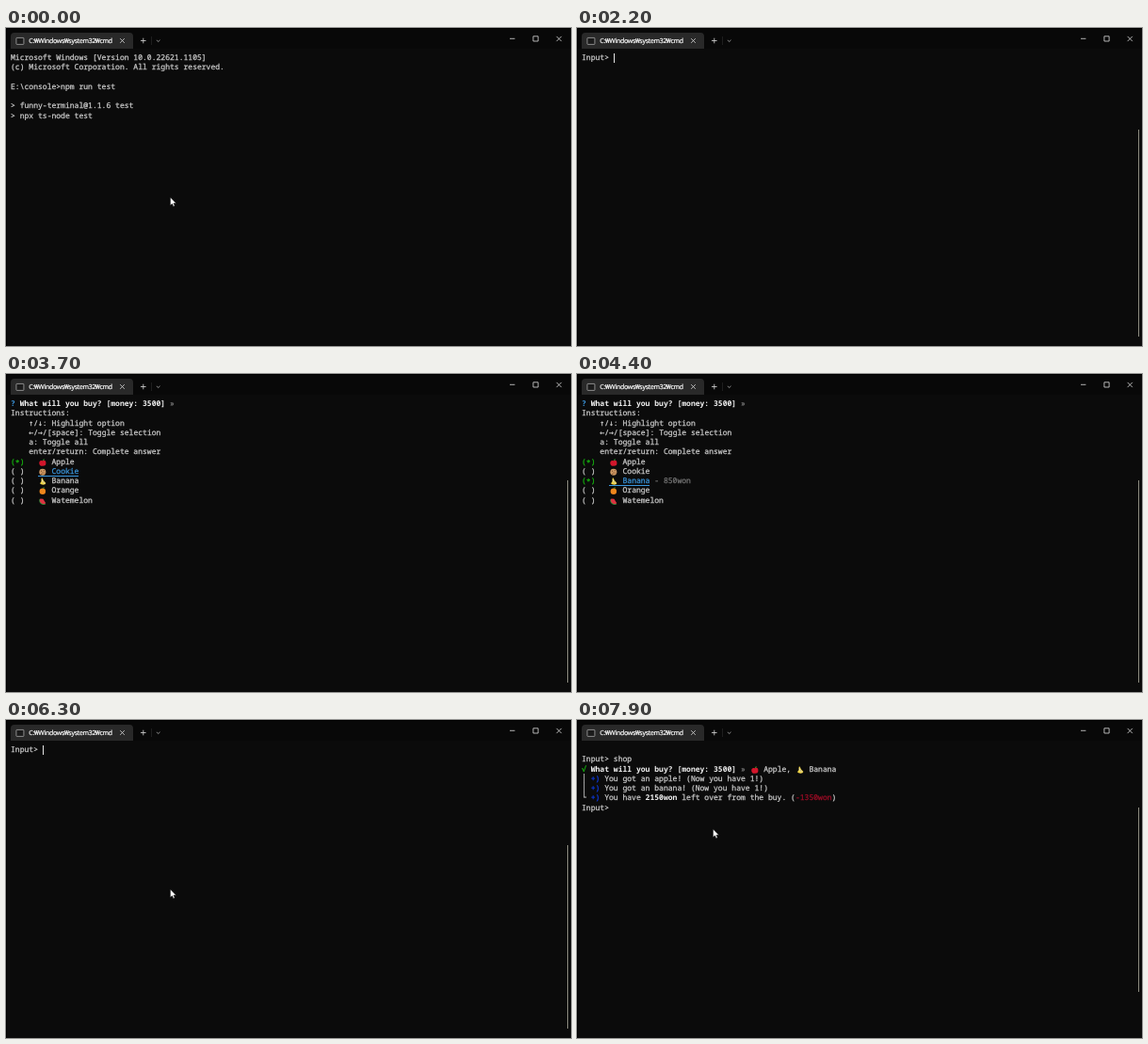
Animation of 600x338 px, one loop 8000 ms. Source, as an HTML page:

```html
<!DOCTYPE html>
<html lang="en">
<head>
<meta charset="utf-8">
<title>Terminal shop</title>
<style>
  html, body { margin: 0; width: 100%; height: 100%; overflow: hidden; background: #000; }
  #stage { position: relative; width: 600px; height: 338px; overflow: hidden; background: #0b0b0b; }
  #chrome, #mouse { position: absolute; left: 0; top: 0; }
  #chrome text {
    font: 500 7px "Noto Sans", "Open Sans", sans-serif; letter-spacing: -.32px;
    fill: #fff; stroke: #fff; stroke-width: .2px; text-rendering: geometricPrecision;
  }
  #screen {
    position: absolute; left: 5px; top: 27.2px; margin: 0; color: #ccc;
    font: 8.066px/10.25px "Noto Sans Mono", "DejaVu Sans Mono", monospace;
    font-variant-ligatures: none; text-rendering: geometricPrecision; -webkit-text-stroke: .25px;
  }
  b { color: #f2f2f2; font-weight: 700; -webkit-text-stroke: 0; }
  .c { color: #3a96dd; }
  .g { color: #16b80f; }
  .d { color: #767676; }
  .n { color: #0f3be0; }
  .r { color: #a00c26; }
  .star { position: relative; top: 1.3px; }
  .arrow { font-family: "DejaVu Sans Mono", monospace; }
  u { position: relative; display: inline-block; height: 10.25px; vertical-align: top; color: #3a96dd; text-decoration: none; }
  u::after { content: ""; position: absolute; left: 0; right: 0; top: 9px; height: .8px; background: #3a96dd; }
  .e { display: inline-block; width: 9.68px; height: 10.25px; vertical-align: top; }
  #caret { position: absolute; width: 1px; height: 10.25px; background: #e6e6e6; }
  #thumb { position: absolute; left: 596px; width: 1px; background: #8c8b80; }
</style>
</head>
<body>
<div id="stage">
  <svg id="chrome" width="600" height="338" fill="none">
    <defs>
      <g id="apple"><path d="M5 3C3 1.800 1 3 1 5.600S3 9.400 5 9s4 .2 4-3.400S7 1.800 5 3z" fill="#d3162b"/><path d="M5 3q0-2 2.400-2.200Q7.200 2.800 5 3z" fill="#3f8f2c"/></g>
      <g id="cookie"><circle cx="5" cy="5.200" r="3.900" fill="#cf9a64"/><path d="M3 4h1.200M6 3.400h1.200M4.600 6h1.200M7 6.200h1M3.200 7.400h1.200" stroke="#6a3a20" stroke-width="1"/></g>
      <g id="banana"><path d="M3.600 1.200l1.200-.2Q5.400 4.200 9 7.200 8.200 9 5.800 9 2.800 9 1.600 7.200L3 6.200Q4.200 4.600 3.600 1.200z" fill="#f0d548"/><path d="M4.200 3Q4.800 6 7.600 7.600" stroke="#fff6cc" stroke-width="1.100"/></g>
      <g id="orange"><circle cx="5" cy="5.700" r="3.600" fill="#f0861c"/><path d="M5 2.600Q5 .8 7.400.8 7 2.800 5 2.600z" fill="#4b9a2e"/></g>
      <g id="melon"><path d="M1.400 2.400A5 5 0 0 0 8.800 8.400z" fill="#2f8f3a"/><path d="M2.200 2.200A4.300 4.300 0 0 0 8.800 7.400L5.600 2.400z" fill="#dc3340"/></g>
    </defs>
    <path d="M0 0H600V22H0z" fill="#080808"/>
    <path d="M.5 338V.5H600" stroke="#000"/>
    <path d="M5 22V9q0-4 4-4H131q4 0 4 4V22z" fill="#292929"/>
    <rect x="10.900" y="10.400" width="8" height="7" rx=".6" fill="#1b1b1b" stroke="#a8a8a8" stroke-width=".8"/>
    <text x="24.300" y="16.300">C:₩Windows₩system32₩cmd</text>
    <g stroke="#dcdcdc" stroke-width=".8">
      <path d="M121.200 11.200l4.600 4.600m0-4.600l-4.600 4.600M143 13.500h5.600m-2.800-2.800v5.600"/>
      <path d="M535 11.300h5.400M559.900 8.800h5.200v5.200h-5.200zM584.600 8.900l5.200 5.200m0-5.200l-5.200 5.200"/>
    </g>
    <path d="M159.900 12.800l1.800 1.700 1.800-1.700" stroke="#b0b0b0" stroke-width=".8"/>
    <path d="M154.500 9v9" stroke="#1e1e1e"/>
  </svg>
  <pre id="screen"></pre>
  <div id="caret"></div>
  <div id="thumb"></div>
  <svg id="mouse" width="10" height="14"><path d="M.5.5v8.600l2-1.800 1.300 2.900 1.400-.6-1.300-2.800h2.700z" fill="#fff" stroke="#000" stroke-width=".4"/></svg>
</div>
<script>
const LOOP = 8000, COL = 4.84, ROW = 10.25;
const el = id => document.getElementById(id);
const tag = (cls, s) => `<span class="${cls}">${s}</span>`;
const icon = id => `<svg class="e" viewBox="-.4 -.4 10.8 10.8"><use href="#${id}"/></svg>`;

const intro = `Microsoft Windows [Version 10.0.22621.1105]
(c) Microsoft Corporation. All rights reserved.

E:\\console&gt;npm run test

&gt; funny-terminal@1.1.6 test
&gt; npx ts-node test`;

const ask = `<b class="c">?</b> <b>Do you like apple?</b> ${tag('d', '» - Use arrow-keys. Return to submit.')}
${tag('c', '&gt;')}   <u>Yep</u>
    No`;

const goods = [['apple', 'Apple', ' - 500won'], ['cookie', 'Cookie', ''], ['banana', 'Banana', ' - 850won'],
  ['orange', 'Orange', ''], ['melon', 'Watemelon', '']];
const question = '<b>What will you buy? [money: 3500]</b> ' + tag('d', '»');

function menu(current, picked) {
  const rows = goods.map(([id, name, price], i) => {
    const box = picked.includes(i) ? tag('g', `(${tag('star', '*')})`) : '( )';
    const label = icon(id) + ' ' + name;
    return box + '   ' + (i === current ? `<u>${label}</u>` + tag('d', price) : label);
  });
  return `<b class="c">?</b> ${question}
Instructions:
    ${tag('arrow', '↑')}/${tag('arrow', '↓')}: Highlight option
    ${tag('arrow', '←')}/${tag('arrow', '→')}/[space]: Toggle selection
    a: Toggle all
    enter/return: Complete answer
` + rows.join('\n');
}

const plus = tag('n', '+)');
const log = ['', 'Input&gt; shop',
  `${tag('g', '√')} ${question} ${icon('apple')} Apple, ${icon('banana')} Banana`,
  `│ ${plus} You got an apple! (Now you have 1!)`,
  `│ ${plus} You got an banana! (Now you have 1!)`,
  `└ ${plus} You have <b>2150won</b> left over from the buy. (${tag('r', '-1350won')})`,
  'Input&gt;'];
const tail = from => log.slice(from).join('\n');

// Each track lists [start ms, value...]
const screens = [[0, intro], [1100, ask], [2000, 'Input&gt;'], [2700, 'Input&gt; s'], [2800, 'Input&gt; sho'],
  [3100, menu(0, [0])], [3700, menu(1, [0])], [3900, menu(2, [0])], [4200, menu(2, [0, 2])],
  [4500, tail(6)], [6900, tail(3)], [7100, tail(0)]];
const carets = [[0], [200, 0, 8], [700], [2000, 7, 0], [2700, 8, 0], [2800, 10, 0], [3100], [4500, 7, 0],
  [5400], [5900, 7, 0], [6500], [7000, 7, 3], [7100, 7, 6], [7500]];
const thumbs = [[0], [1100, 96, 328], [2000, 103, 328], [2100, 108, 328], [3200, 113, 328], [4500, 133, 328],
  [6900, 113, 308], [7200, 93, 289]];

const at = (track, t) => track.findLast(step => step[0] <= t);
const show = (node, on) => { node.style.visibility = on ? 'visible' : 'hidden'; };
let shown = null;

function draw(t) {
  const [, html] = at(screens, t);
  if (html !== shown) el('screen').innerHTML = shown = html;

  const [, col, row] = at(carets, t), caret = el('caret');
  show(caret, col !== undefined);
  if (col !== undefined) {
    caret.style.left = 5 + col * COL + 'px';
    caret.style.top = 26.6 + row * ROW + 'px';
  }

  const [, top, bottom] = at(thumbs, t), thumb = el('thumb');
  show(thumb, top !== undefined);
  if (top !== undefined) {
    thumb.style.top = top + 'px';
    thumb.style.height = bottom - top + 'px';
  }

  const p = Math.min(1, Math.max(0, (t - 6300) / 500)), k = p * p * (3 - 2 * p);
  show(el('mouse'), t < 2000 || t >= 6300);
  el('mouse').style.transform = `translate(${174 - 30 * k}px, ${179.5 - 64 * k}px)`;
}

const start = performance.now();
function tick() {
  draw((performance.now() - start) % LOOP);
  requestAnimationFrame(tick);
}
tick();
</script>
</body>
</html>
```
